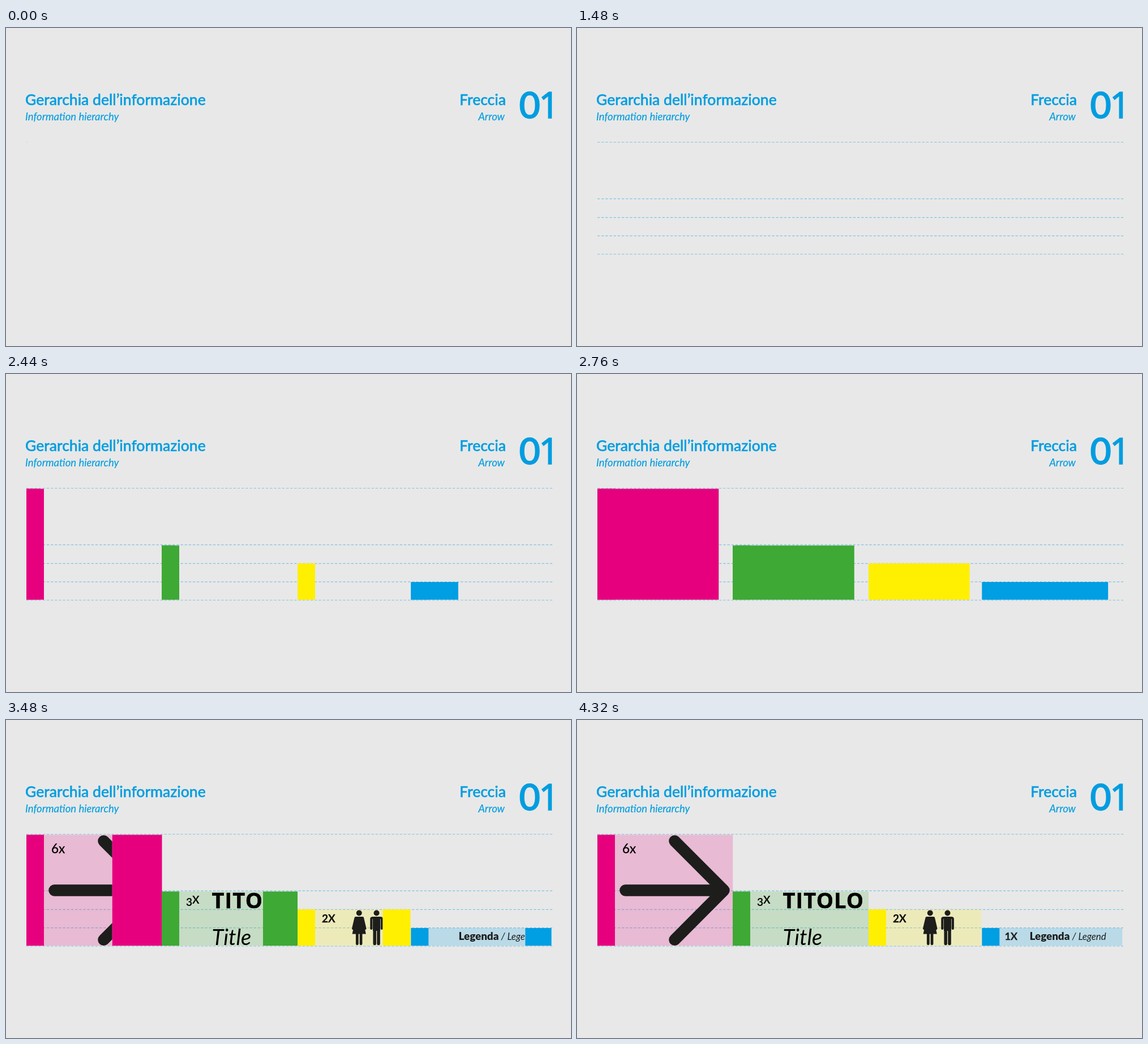
An HTML page that plays this animation: 998x561 px, repeating every 5000 ms.

```html
<!DOCTYPE html>
<html lang="it">
<head>
<meta charset="utf-8">
<style>
html, body { margin: 0; width: 100%; height: 100%; overflow: hidden; background: #e8e8e8; }
svg { display: block; width: 998px; height: 561px; font-family: Lato, "Open Sans", sans-serif; }
.head { fill: #009de0; stroke: #009de0; stroke-width: 0; }
.title { font-size: 26.5px; font-weight: 500; stroke-width: .5px; }
.sub { font-size: 18.5px; font-style: italic; stroke-width: .15px; }
.num { font-size: 64px; font-weight: 500; stroke-width: 1.7px; }
.end { text-anchor: end; }
.open { font-family: "Open Sans", "Noto Sans", sans-serif; }
.ink { fill: #1d1d1b; }
.pen { fill: none; stroke: #1d1d1b; stroke-linecap: round; stroke-linejoin: round; }
.label { font-size: 19px; font-weight: 600; stroke: #1d1d1b; stroke-width: .5px; }
#lines path { stroke: #7fc3e2; stroke-width: 1.2; stroke-dasharray: 4.3 2.87; }
</style>
</head>
<body>
<svg viewBox="0 0 998 561">
  <g class="head">
    <text class="title" x="34" y="136.3">Gerarchia dell’informazione</text>
    <text class="sub" x="34" y="162.5">Information hierarchy</text>
    <text class="title end" x="883" y="136.3">Freccia</text>
    <text class="sub end" x="881" y="162.5">Arrow</text>
    <text class="num" x="906.5" y="158.5">0</text>
    <text class="num open" x="941" y="158.5">1</text>
  </g>
  <g id="lines"></g>
  <g id="blocks"></g>
  <g id="contents">
    <g>
      <text x="80" y="234.5" font-size="22.5" stroke="#000" stroke-width=".3">6x</text>
      <path class="pen" stroke-width="20.5" d="M85.5 300.5H259.5M172.5 213.5L259.5 300.5L172.5 387.7"/>
    </g>
    <g>
      <text class="label" x="318" y="324" style="stroke-width:.2px"><tspan dy="4">3</tspan><tspan dy="-4">X</tspan></text>
      <text class="open" x="363.5" y="332" font-size="38" font-weight="700" letter-spacing="1.1" stroke="#000" stroke-width=".5">TITOLO</text>
      <text x="363.5" y="397" font-size="38" font-style="italic">Title</text>
    </g>
    <g>
      <text class="label" x="558" y="356.5">2X</text>
      <g class="ink">
        <circle cx="623.7" cy="340.5" r="5"/>
        <path d="M618 347H629.5L635.8 377.5H611.6Z"/>
        <path class="pen" stroke-width="4" d="M617.5 349L613 368M630 349L634.5 368"/>
        <path class="pen" stroke-width="4.8" d="M620.3 376V394.8M627 376V394.8"/>
        <circle cx="654.5" cy="340.5" r="5"/>
        <path d="M648 347H661V372H648Z"/>
        <path class="pen" stroke-width="4.2" d="M645.3 368V351Q645.3 349 648 349H661Q663.8 349 663.8 351V368"/>
        <path class="pen" stroke-width="5.6" d="M651.2 370V394.4M658 370V394.4"/>
      </g>
    </g>
    <g class="ink">
      <text id="last" class="label" x="755.5" y="388" style="font-size:18px">1X</text>
      <text x="799.5" y="388" font-size="18.8" font-weight="900">Legenda</text>
      <text x="874.5" y="388" font-size="16.8" font-style="italic">/ Legend</text>
    </g>
  </g>
</svg>
<script>
const LOOP = 5000, STEP = 40, BASE = 398.2, LEFT = 36, RIGHT = 965, BAR = 31;
const $ = id => document.getElementById(id);

function make(tag, parent, attrs) {
  const el = document.createElementNS("http://www.w3.org/2000/svg", tag);
  for (const key in attrs) el.setAttribute(key, attrs[key]);
  return parent.appendChild(el);
}

// Eased progress along the curve (.66, 0, .62, 1)
function ease(t, start, length) {
  const u = (t - start) / length;
  if (u <= 0) return 0;
  if (u >= 1) return 1;
  let lo = 0, hi = 1, s;
  for (let i = 0; i < 24; i++) {
    s = (lo + hi) / 2;
    const x = 3 * s * (1 - s) * ((1 - s) * .66 + s * .62) + s ** 3;
    if (x < u) lo = s; else hi = s;
  }
  return s * s * (3 - 2 * s);
}

const lines = [201.5, 301.3, 334.3, 366.7, 399].map(y => ({ y, el: make("path", $("lines"), {}) }));

// rise: length of the upward growth; grow: [start, length]; wipe: start of the reveal
const blocks = [
  { x: 36, end: 275.5, top: 202.5, color: "#e6007e", rise: 520, grow: [2240, 640], wipe: 2626 },
  { x: 275, end: 515, top: 302.5, color: "#3ea935", rise: 520, grow: [2240, 640], wipe: 2557 },
  { x: 515, end: 714.5, top: 334, color: "#ffef00", rise: 520, grow: [2240, 640], wipe: 2551 },
  { x: 715.3, end: 963.5, top: 367, color: "#009ee3", rise: 320, grow: [1880, 1080], wipe: 2510 }
];
const contents = [...$("contents").children];
blocks.forEach((b, i) => {
  const g = $("blocks"), height = BASE - b.top;
  const clip = make("clipPath", g, { id: "clip" + i });
  b.window = make("rect", clip, { x: b.x, y: b.top - 1, height: height + 2 });
  const inside = make("g", g, { "clip-path": `url(#clip${i})` });
  make("rect", inside, { x: b.x, y: b.top, width: b.end - b.x, height, fill: b.color, opacity: .2 });
  inside.append(contents[i]);
  b.solid = make("rect", g, { fill: b.color });
  b.bar = make("rect", g, { fill: b.color });
});

function place(rect, x, width, top) {
  rect.setAttribute("x", x);
  rect.setAttribute("width", Math.max(0, width));
  rect.setAttribute("y", top);
  rect.setAttribute("height", BASE - top);
}

function draw(now) {
  const t = Math.floor(now % LOOP / STEP) * STEP;
  lines.forEach(({ y, el }, i) => {
    const p = ease(t, 80 * i - 40, 1200);
    el.setAttribute("d", p ? `M${LEFT} ${y}H${LEFT + (RIGHT - LEFT) * p}` : "");
  });
  for (const b of blocks) {
    const width = b.end - b.x;
    const top = BASE - (BASE - b.top) * ease(t, 1880, b.rise);
    const front = width * ease(t, ...b.grow), back = width * ease(t, b.wipe, 1280);
    place(b.bar, b.x, BAR, top);
    place(b.solid, b.x + back, front - back, top);
    b.window.setAttribute("width", back);
  }
  $("last").setAttribute("opacity", Math.min(1, Math.max(0, (t - 3560) / 200)));
  requestAnimationFrame(() => draw(performance.now()));
}
draw(0);
</script>
</body>
</html>
```
